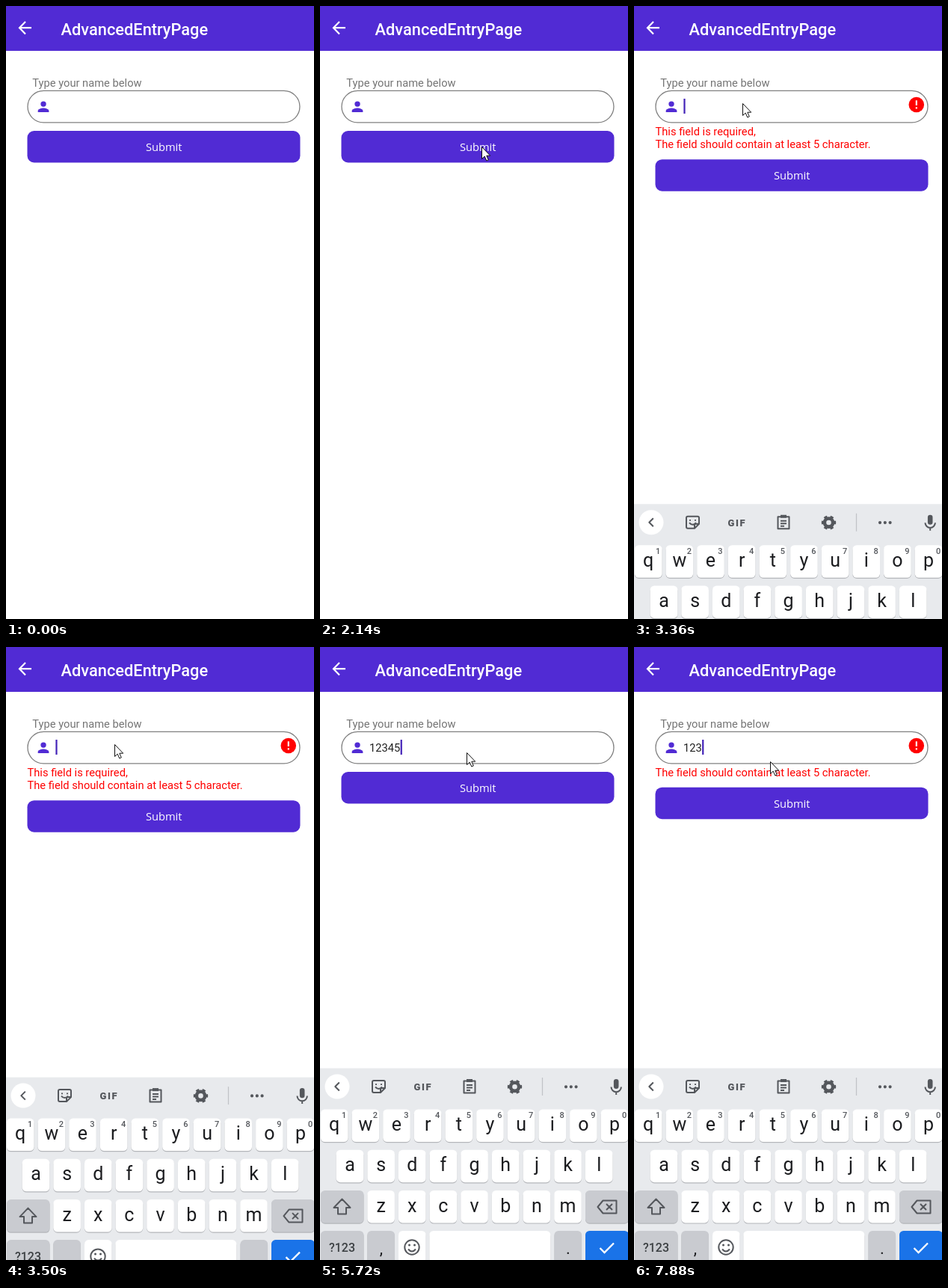
An HTML page that plays this animation: 412x820 px, repeating every 8 s.

```html
<!DOCTYPE html>
<html lang="en">
<head>
<meta charset="utf-8">
<title>Entry validation</title>
<style>
html, body { margin: 0; height: 100%; overflow: hidden; background: #fff; }
svg { display: block; font: 14.7px Roboto, sans-serif; }
.mid { text-anchor: middle; }
.line { fill: none; stroke-linejoin: round; }
</style>
</head>
<body>
<svg width="412" height="820" viewBox="0 0 412 820">
  <defs>
    <radialGradient id="glow">
      <stop offset="0" stop-color="#fff"/>
      <stop offset=".6" stop-color="#fff" stop-opacity=".95"/>
      <stop offset="1" stop-color="#fff" stop-opacity=".55"/>
    </radialGradient>
    <clipPath id="btn"><rect x="28.5" y="167" width="365" height="42.5" rx="9"/></clipPath>
  </defs>

  <rect width="412" height="60" fill="#512bd4"/>
  <path d="M34 29.2H18.5M26 21l-8 8.2 8 8.2" class="line" style="stroke-linejoin:miter" stroke="#fff" stroke-width="2.2"/>
  <text x="73.5" y="38.5" font-size="21.8" font-weight="500" fill="#fff">AdvancedEntryPage</text>

  <text x="35.3" y="108.3" fill="#757575">Type your name below</text>
  <rect x="29" y="113.4" width="364" height="42.4" rx="21.2" fill="#fff" stroke="#808080" stroke-width="1.3"/>
  <path transform="translate(39 123.7) scale(.92)" fill="#512bd4" d="M12 12a4 4 0 1 0 0-8 4 4 0 0 0 0 8zm0 2c-2.7 0-8 1.3-8 4v2h16v-2c0-2.7-5.3-4-8-4z"/>
  <text id="entry" x="66" y="140" fill="#212121"></text>
  <rect id="caret" y="124" width="2.2" height="20" fill="#4323b8"/>

  <g id="errors" fill="red">
    <circle cx="377.8" cy="132" r="10.3"/>
    <path d="M377.8 126.3v6.6M377.8 135.2v2.2" stroke="#fff" stroke-width="2.1"/>
    <text id="first" x="28.5" y="172.5"></text>
    <text id="second" x="28.5" y="190"></text>
  </g>

  <g id="submit">
    <rect x="28.5" y="167" width="365" height="42.5" rx="9" fill="#512bd4"/>
    <g clip-path="url(#btn)"><circle id="ripple" cx="211" cy="188" fill="url(#glow)"/></g>
    <text x="211.2" y="194" class="mid" fill="#fff" style="font-family:'Open Sans',sans-serif">Submit</text>
  </g>

  <g id="keyboard">
    <rect y="563.5" width="412" height="260" fill="#e8eaed"/>
    <g id="keys"></g>
    <circle cx="23" cy="588" r="16.5" fill="#fff"/>
    <g class="line" stroke="#54575c" stroke-width="2">
      <path d="M25.8 582.5l-5.5 5.5 5.5 5.5"/>
      <path d="M72 580h13q2 0 2 2v8l-6 6h-9q-2 0-2-2v-12q0-2 2-2zM87 590h-4q-2 0-2 2v4M74 588.5q4.500 5 9 0M75 584.300v1.800M82 584.300v1.800"/>
      <path d="M192.500 580.500h15v16h-15zM196 586h8M196 589.500h8M196 593h5"/>
      <path d="M196 580h8" stroke-width="4"/>
      <circle cx="260.500" cy="588.300" r="5.600" stroke-width="4.600"/>
      <circle cx="260.500" cy="588.300" r="8.200" stroke-width="3" pathLength="48" stroke-dasharray="4 4" stroke-dashoffset="2"/>
      <path d="M297.500 576v24" stroke="#c2c4c8" stroke-width="1.300"/>
      <path d="M389.500 588.500a6.700 6.700 0 0 0 13.400 0M396.200 595v4"/>
      <path d="M396.200 581.300v6.500" stroke-width="6.600" stroke-linecap="round"/>
      <path d="M329 588.300h.01M335.800 588.300h.01M342.600 588.300h.01" stroke-width="4.200" stroke-linecap="round"/>
      <path d="M29.500 738.500l-11 11.500h5.500v8.500h11v-8.500h5.500z"/>
      <path d="M378.500 740.500h18v17h-18l-7-8.500zM383 745l8 8M391 745l-8 8"/>
      <circle cx="123" cy="803" r="9.700"/>
      <path d="M118 805.500q5 6 10 0"/>
      <path d="M119.500 800h.01M126.500 800h.01" stroke-width="3" stroke-linecap="round"/>
      <path d="M374.500 804l6 6 12.500-12.500" stroke="#fff" stroke-width="2.300" style="stroke-linejoin:miter"/>
    </g>
    <text x="125.500" y="592.800" font-size="13" font-weight="900" letter-spacing="1.600" fill="#54575c">GIF</text>
  </g>

  <path id="pointer" d="M.5 .5V16.500L4.200 13.100 6.800 19 9.300 17.900 6.800 12.200H11.700Z" fill="#fff" stroke="#111"/>
</svg>
<script>
const $ = id => document.getElementById(id);
const LOOP = 8000, STEP = 67.6;
const REQUIRED = 'This field is required,';
const TOO_SHORT = 'The field should contain at least 5 character.';

// [time, value]: each value holds until the next time
const typed = [[0, ''], [3600, '1'], [4180, '12'], [4720, '123'], [4990, '1234'],
  [5260, '12345'], [7150, '1234'], [7680, '123']];
const problems = [[0, 0], [2475, 2], [3600, 1], [5320, 0], [7215, 1]];
const caretOn = [[0, 0], [3290, 1], [5860, 0], [6330, 1], [6880, 0], [7150, 1]];

// [time, x, y] of the pointer tip
const path = [[110, 343, 808], [515, 221, 221], [853, 221, 221], [1260, 94, 91],
  [1665, 252, 220], [1935, 252, 220], [2138, 216, 188], [2280, 208, 204],
  [2814, 208, 204], [3220, 145, 130], [3640, 145, 130], [3828, 194, 149],
  [5620, 194, 149], [5720, 196, 141], [5800, 196, 141], [6060, 235, 165],
  [6330, 213, 187], [6600, 213, 187], [6802, 187, 156], [6937, 182, 153]];

const clamp = v => Math.max(0, Math.min(1, v));
const held = (list, t) => list.findLast(e => e[0] <= t)[1];

function pointerAt(t) {
  const i = path.findIndex(p => p[0] > t);
  if (i < 0) return path.at(-1).slice(1);
  if (i === 0) return path[0].slice(1);
  const [t0, x0, y0] = path[i - 1], [t1, x1, y1] = path[i];
  const p = (t - t0) / (t1 - t0), e = p * (1.4 - .4 * p);
  return [x0 + (x1 - x0) * e, y0 + (y1 - y0) * e];
}

function buildKeys() {
  const key = (x, y, w, fill) =>
    `<rect x="${x}" y="${y + 1.2}" width="${w}" height="43.500" rx="5.500" fill="#b4b6ba"/>` +
    `<rect x="${x}" y="${y}" width="${w}" height="43.500" rx="5.500" fill="${fill}"/>`;
  const label = (x, y, s, size, rest = 'fill="#1b1c1f"') =>
    `<text class="mid" x="${x}" y="${y}" font-size="${size}" ${rest}>${s}</text>`;
  const grey = '#c9cbd0', soft = 'font-weight="500" fill="#54575c"';
  let out = '';
  [['qwertyuiop', 19.2], ['asdfghjkl', 40], ['zxcvbnm', 81.6]].forEach(([row, x0], r) => {
    const y = 618.5 + 54.2 * r;
    [...row].forEach((c, i) => {
      const x = x0 + 41.65 * i;
      out += key(x - 18.3, y, 36.6, '#fff') + label(x, y + 28.7, c, 25);
      if (!r) out += label(x + 13, y + 11.5, (i + 1) % 10, 11, soft);
    });
  });
  [[1, 727, 57.5, grey], [355, 727, 58, grey], [1, 781, 57.5, grey], [63.3, 781, 36.6, grey],
   [105, 781, 36.6, '#fff'], [146.3, 781, 162, '#fff'], [313.5, 781, 36.6, grey],
   [355, 781, 58, '#1a73e8']].forEach(k => out += key(...k));
  out += label(29.500, 809, '?123', 16, 'font-weight="500" fill="#3c4043"');
  out += label(82, 812, ',', 22) + label(332, 812, '.', 22);
  $('keys').innerHTML = out;
}

function draw(t) {
  const text = held(typed, t), count = held(problems, t);
  $('entry').textContent = text;
  $('caret').setAttribute('x', 66.4 + 8.25 * text.length);
  $('caret').style.opacity = held(caretOn, t);

  $('errors').style.opacity = count ? 1 : 0;
  $('first').textContent = count > 1 ? REQUIRED : TOO_SHORT;
  $('second').textContent = count > 1 ? TOO_SHORT : '';
  $('submit').setAttribute('transform', `translate(0 ${[0, 20.7, 38.2][count]})`);

  const step = 110 + STEP * Math.floor((t - 110) / STEP);
  const pressed = t >= 2340 && t < 2810;
  $('ripple').setAttribute('r', 60 + 180 * clamp((step - 2340) / 260));
  $('ripple').style.opacity = pressed ? .18 * clamp((2880 - step) / 200) : 0;

  const drop = (1 - clamp((step - 3260) / 360)) ** 3;
  $('keyboard').setAttribute('transform', `translate(0 ${257 * drop})`);

  $('pointer').setAttribute('transform', `translate(${pointerAt(step)})`);
  $('pointer').style.opacity = t < 110 ? 0 : 1;
}

buildKeys();
const start = performance.now();
function tick() {
  draw((performance.now() - start) % LOOP);
  requestAnimationFrame(tick);
}
tick();
</script>
</body>
</html>
```
